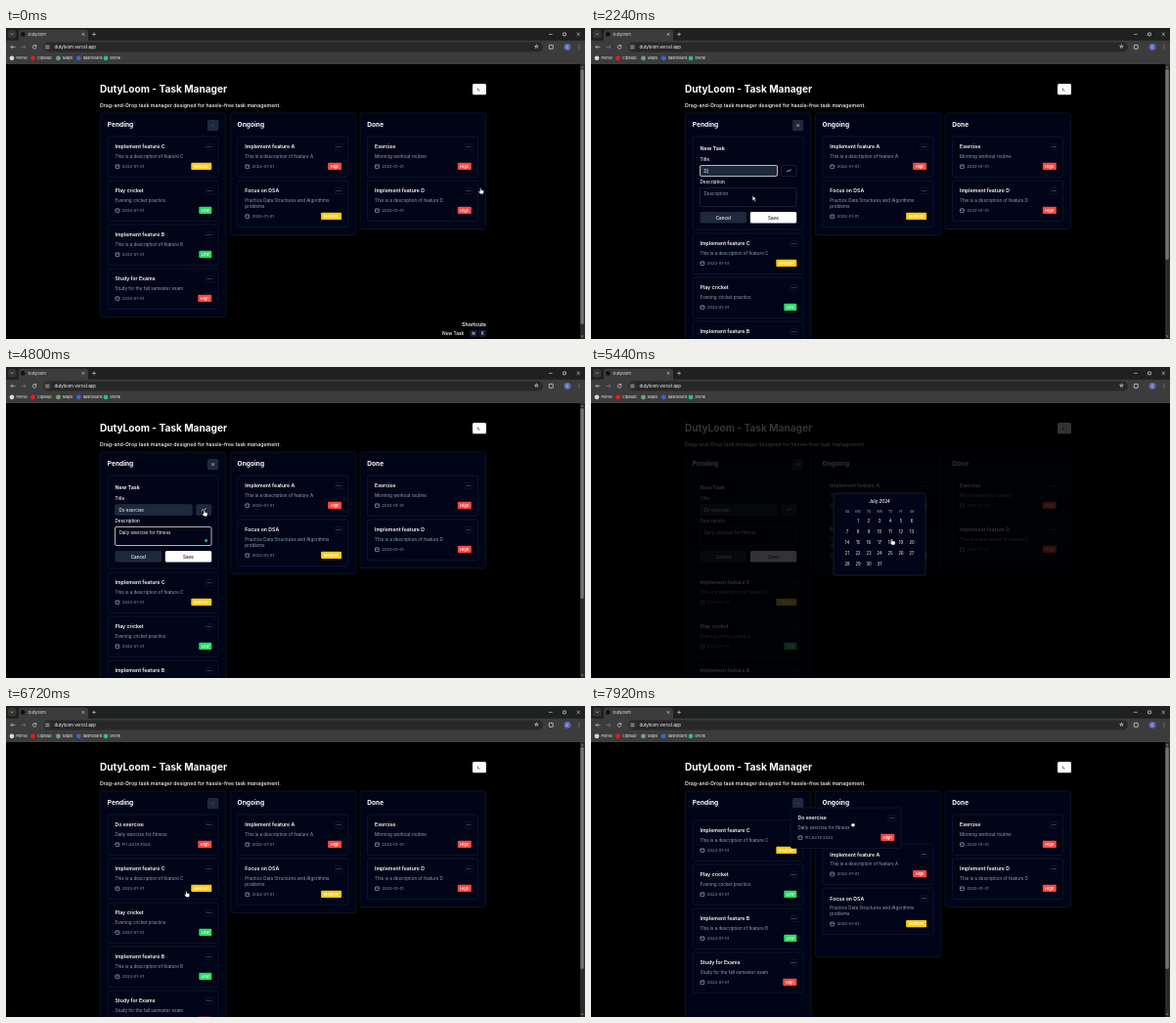
An HTML page for the animation above (8000 ms loop, 592 by 318 pixels).

```html
<!DOCTYPE html>
<html lang="en">
<head>
<meta charset="utf-8">
<title>Task board</title>
<style>
  html, body { margin: 0; width: 100%; height: 100%; overflow: hidden; background: #000; }
  svg { display: block; width: 100vw; height: 100vh; font-family: Inter, "Open Sans", sans-serif; }
  text { white-space: pre; }
</style>
</head>
<body>
<svg id="stage" viewBox="0 0 592 318"></svg>
<script>
const LOOP = 8000, STEP = 80;
const WHITE = '#fff', MUTED = '#94a3b8', LINE = '#101a30', SLATE = '#1e293b', CARD = '#010517';
const PRIORITY = { Low: ['#2bdc66', 13], Medium: ['#facc15', 21], High: ['#fa4743', 14] };
const stage = document.getElementById('stage');

function el(parent, tag, attrs = {}) {
  const node = document.createElementNS('http://www.w3.org/2000/svg', tag);
  set(node, attrs);
  return parent.appendChild(node);
}
function set(node, attrs) {
  for (const key in attrs) node.setAttribute(key, attrs[key]);
}
const group = parent => el(parent, 'g');
const show = (node, on) => set(node, { visibility: on ? 'visible' : 'hidden' });
const move = (node, x, y) => set(node, { transform: `translate(${x} ${y})` });

// Text is placed by its vertical middle.
function label(parent, x, y, string, size, fill = WHITE, weight = 400, anchor = 'start') {
  const node = el(parent, 'text', {
    x, y: y + size * .35, fill, 'font-size': size, 'font-weight': weight, 'text-anchor': anchor
  });
  node.textContent = string;
  return node;
}
function box(parent, x, y, width, height, fill, rx = 1.5, stroke = 'none') {
  return el(parent, 'rect', { x, y, width, height, fill, rx, stroke, 'stroke-width': .7 });
}
function dot(parent, cx, cy, r, fill) {
  return el(parent, 'circle', { cx, cy, r, fill });
}
function line(parent, d, stroke = '#dfe1e4', width = .6) {
  return el(parent, 'path', { d, stroke, 'stroke-width': width, fill: 'none', 'stroke-linecap': 'round' });
}

function column(x, name, height) {
  const frame = box(page, x, 87, 128.5, height, '#000417', 2, LINE);
  label(page, x + 7.3, 98.7, name, 6.6, WHITE, 700);
  return frame;
}
function card(parent, x, y, title, lines, date, priority) {
  const g = group(parent), extra = (lines.length - 1) * 6, foot = y + 30.5 + extra;
  box(g, x, y, 113, 41.5 + extra, CARD, 2, LINE);
  label(g, x + 7.5, y + 10.5, title, 5.2, WHITE, 600);
  box(g, x + 99.7, y + 7.5, 7.6, 6.2, 'none', 1, LINE);
  for (const i of [-1, 0, 1]) dot(g, x + 103.5 + i * 1.7, y + 10.6, .45, '#e2e8f0');
  lines.forEach((text, i) => label(g, x + 7.5, y + 20 + i * 6, text, 4.55, MUTED));
  box(g, x + 8, foot - 1.7, 3.8, 3.8, 'none', .5, MUTED);
  line(g, `M${x + 8} ${foot - .4}h3.8`, MUTED, .5);
  label(g, x + 15, foot, date, 4.05, MUTED);
  const [color, width] = PRIORITY[priority];
  box(g, x + 106.3 - width, foot - 3.7, width, 7.3, color, 1);
  label(g, x + 106.3 - width / 2, foot, priority, 4, WHITE, 500, 'middle');
  return g;
}

const page = group(stage);
label(page, 96, 62.5, 'DutyLoom - Task Manager', 10.1, WHITE, 700);
label(page, 96, 79, 'Drag-and-Drop task manager designed for hassle-free task management.', 5.25, WHITE, 500);
box(page, 477, 57, 14, 11.2, '#fff', 1.5);
el(page, 'path', { d: 'M483.2 60.8a1.9 1.9 0 1 0 2.4 2.4a1.7 1.7 0 0 1-2.4-2.4', fill: '#64748b' });

const DATE = '2022-01-01';
const about = letter => [`This is a description of feature ${letter}`];
const pending = column(96.5, 'Pending', 208.5);
const ongoing = column(229.3, 'Ongoing', 124.5);
column(362, 'Done', 118.5);

box(page, 206, 94, 11.2, 11.2, SLATE, 1.5);
const plus = line(page, 'M210 99.6h3.2M211.6 98v3.2', '#334155');
const cross = line(page, 'M210.5 98.5l2.2 2.2m0-2.2l-2.2 2.2', '#e2e8f0');

const ongoingCards = group(page);
card(ongoingCards, 236.8, 111, 'Implement feature A', about('A'), DATE, 'High');
card(ongoingCards, 236.8, 156, 'Focus on DSA', ['Practice Data Structures and Algorithms', 'problems'], DATE, 'Medium');
card(page, 369.5, 111, 'Exercise', ['Morning workout routine'], DATE, 'High');
card(page, 369.5, 156, 'Implement feature D', about('D'), DATE, 'High');

const pendingCards = group(page);
[
  ['Implement feature C', about('C'), 'Medium'],
  ['Play cricket', ['Evening cricket practice'], 'Low'],
  ['Implement feature B', about('B'), 'Low'],
  ['Study for Exams', ['Study for the fall semester exam'], 'High']
].forEach(([title, lines, priority], i) => card(pendingCards, 104, 111 + i * 45, title, lines, DATE, priority));
const added = card(page, 104, 111, 'Do exercise', ['Daily exercise for fitness'], 'Fri Jul 19 2024', 'High');

const shortcuts = group(page);
label(shortcuts, 491, 302.7, 'Shortcuts', 5.3, WHITE, 600, 'end');
label(shortcuts, 468.3, 312.3, 'New Task', 4.8, WHITE, 500, 'end');
for (const [x, key] of [[478, '⌘'], [487.3, 'K']]) {
  box(shortcuts, x - 4, 308.7, 8, 7.4, '#0f172a', 1);
  label(shortcuts, x, 312.4, key, 4.6, '#cbd5e1', 500, 'middle');
}

const form = group(page);
box(form, 104, 111, 113, 95, CARD, 2, LINE);
label(form, 111.5, 123, 'New Task', 5.4, WHITE, 600);
label(form, 111.5, 134.2, 'Title', 4.6, WHITE, 500);
label(form, 111.5, 157.5, 'Description', 4.6, WHITE, 500);
const titleBox = box(form, 111.5, 140.5, 79, 11, CARD);
const titleText = label(form, 115.5, 146, '', 4.6);
const dateButton = box(form, 194.5, 140.5, 15.5, 11, CARD, 1.5, SLATE);
line(form, 'M200.2 147l1.5-1.4 1 .8 1.5-1.6', '#e2e8f0', .8);
const notesBox = box(form, 111.5, 163.5, 98.5, 19, CARD);
const notesText = label(form, 115.5, 169.6, '', 4.55);
const checker = dot(form, 204.6, 177.4, 1.6, '#26a269');
box(form, 111.5, 188, 47.7, 11.5, SLATE);
label(form, 135.3, 194, 'Cancel', 4.6, WHITE, 500, 'middle');
box(form, 162.8, 188, 47.4, 11.5, '#fff');
label(form, 186.5, 194, 'Save', 4.6, '#0f172a', 500, 'middle');

const track = group(page);
box(track, 587, 37, 5, 281, '#2b2b2b', 0);
el(track, 'path', { d: 'M588 40.5l1.3-1.8 1.3 1.8zM588 314.5l1.3 1.8 1.3-1.8z', fill: '#8b8b8b' });
const thumb = box(track, 587.4, 42, 3.4, 261, '#737373', 1.7);

const modal = group(stage);
box(modal, 0, 37, 592, 281, 'rgba(0,0,0,.8)', 0);
box(modal, 248, 129, 94, 84, CARD, 2, SLATE);
label(modal, 295, 137, 'July 2024', 4.5, WHITE, 500, 'middle');
'Su Mo Tu We Th Fr Sa'.split(' ').forEach((day, i) =>
  label(modal, 262 + i * 11, 148, day, 3.8, MUTED, 400, 'middle'));
for (let day = 1; day <= 31; day++) {
  label(modal, 262 + day % 7 * 11, 158 + Math.floor(day / 7) * 11, day, 4.2, WHITE, 400, 'middle');
}

function browserBar() {
  const bar = group(stage), soft = '#e8eaed';
  box(bar, 0, 0, 592, 13, '#1f2020', 0);
  box(bar, 2, 2, 8.5, 8.5, '#343535', 2.5);
  line(bar, 'M5.2 5.8l1.1 1.1 1.1-1.1');
  box(bar, 13, 1.8, 71, 14, '#3c3c3c', 3);
  dot(bar, 17.3, 6.4, 2.3, '#111');
  label(bar, 22.5, 6.5, 'Dutyloom', 4, soft);
  line(bar, 'M78 5.4l2 2m0-2l-2 2M88.5 6.4h3M90 4.9v3M555.3 6.4h3M583.8 5l2.8 2.8m0-2.8l-2.8 2.8');
  box(bar, 569.6, 5, 2.8, 2.8, 'none', .3, soft);
  box(bar, 0, 12.8, 592, 24.2, '#3c3c3c', 0);
  line(bar, 'M9 19.4h-4m1.6-1.6l-1.6 1.6 1.6 1.6');
  line(bar, 'M16 19.4h4m-1.6-1.6l1.6 1.6-1.6 1.6', '#858585');
  line(bar, 'M30.6 18.2a1.9 1.9 0 1 0 .4 1.6m-.3-2.4v1.2h-1.2');
  box(bar, 38, 14.4, 511, 10.2, '#282828', 5.1);
  dot(bar, 42.3, 19.5, 3.5, '#3c3c3c');
  line(bar, 'M40.8 18.6h3M40.8 20.4h3');
  label(bar, 49.5, 19.6, 'dutyloom.vercel.app', 4.4, WHITE);
  label(bar, 542.3, 19.4, '☆', 5.5, soft, 400, 'middle');
  box(bar, 555.3, 17.4, 4, 4, 'none', .6, soft);
  dot(bar, 574, 19.4, 3.4, '#5c6bc0');
  label(bar, 574, 19.5, 'C', 3.8, WHITE, 400, 'middle');
  for (const i of [-1, 0, 1]) dot(bar, 586, 19.4 + i * 1.6, .45, soft);
  const bookmarks = [
    [6, '#d9d9d9', 'Pomel'], [27.5, '#f01818', 'ClipNub'], [53.5, '#6aa879', 'Maps'],
    [74.3, '#3767d6', 'dashboard'], [102, '#25c47b', 'brenk']
  ];
  for (const [x, color, name] of bookmarks) {
    dot(bar, x, 30.8, 2.4, color);
    label(bar, x + 4.4, 30.9, name, 3.9, soft);
  }
}
browserBar();

const cursor = group(stage);
const pointer = (d, fill = '#fff') =>
  el(cursor, 'path', { d, fill, stroke: '#111', 'stroke-width': .5, 'stroke-linejoin': 'round' });
const hand = pointer('M-1.5-3.1q.7-.7 1.3 0v1.7l2.2.5q.7.2.6 1l-.5 2.7h-3.2l-1.9-2.6q.2-.8 1.5 0z');
const arrow = pointer('M-1.4-3v5.3l1.3-1.2 1 2 1-.5-1-1.9h1.7z');
const fist = pointer('M-1.8-1q.9-1 1.8-.3q1-.6 1.9.4v1.6q-.4 1.2-1.6 1.2h-1q-1.4-.4-1.5-1.6z');

const PATH = [
  [0, 486, 167], [80, 484, 165], [880, 216.5, 105.5], [1200, 216.5, 105.5], [1920, 166.5, 174.5],
  [3760, 166.5, 174.5], [4400, 180, 160], [4640, 203.5, 150], [5040, 203.5, 150], [5520, 317, 181.5],
  [5680, 317, 181.5], [5920, 184.3, 160], [6400, 186, 194.5], [6640, 186, 194.5],
  [7440, 158, 128], [7600, 158, 128], [7920, 268, 121.5]
];
const clamp = p => Math.max(0, Math.min(1, p));
const progress = (t, start, length) => clamp((t - start) / length);
const easeOut = p => 1 - (1 - p) ** 3;
const smooth = p => p * p * (3 - 2 * p);

function cursorAt(t) {
  const i = PATH.findIndex(stop => stop[0] > t);
  if (i < 0) return PATH[PATH.length - 1].slice(1);
  const [t0, x0, y0] = PATH[i - 1], [t1, x1, y1] = PATH[i];
  const p = smooth((t - t0) / (t1 - t0));
  return [x0 + (x1 - x0) * p, y0 + (y1 - y0) * p];
}

function field(text, value, placeholder, focused) {
  text.textContent = value ? value + (focused ? '|' : '') : placeholder;
  set(text, { fill: value ? WHITE : MUTED });
}

function render(t) {
  const open = t >= 1200 && t < 6640, saved = t >= 6640, dragging = t >= 7680;
  const [x, y] = cursorAt(t);
  const shift = open ? 99 : saved ? 45 : 0;

  show(form, open);
  show(plus, !open);
  show(cross, open);
  show(added, saved);
  move(pendingCards, 0, shift - 45 * easeOut(progress(t, 7822, 200)));
  move(shortcuts, 0, shift);
  set(pending, { height: 208.5 + shift });
  set(thumb, { height: open ? 195 : saved ? 227 : 261 });
  move(added, dragging ? x - 168 : 0, dragging ? y - 128.5 : 0);
  move(ongoingCards, 0, 45 * easeOut(progress(t, 7858, 200)));
  set(ongoing, { height: t >= 7840 ? 169.5 : 124.5 });

  const title = 'Do exercise'.slice(0, Math.max(0, Math.round((t - 2160) / STEP)));
  const typed = t < 4160 ? 19 * progress(t, 3760, 320) : 19 + 7 * progress(t, 4160, 400);
  const notes = 'Daily exercise for fitness'.slice(0, Math.round(typed));
  const onTitle = t < 3280, onNotes = !onTitle && t < 4880;
  field(titleText, title, 'Visit codewithlumo.dev', onTitle);
  field(notesText, notes, 'Description', onNotes && t < 4640);
  set(titleBox, { fill: title ? SLATE : CARD, stroke: onTitle ? WHITE : SLATE });
  set(notesBox, { stroke: onNotes ? WHITE : SLATE });
  set(dateButton, { fill: t >= 4640 && t < 5840 ? SLATE : CARD });
  show(checker, open && notes && t < 4880);

  const fade = progress(t, 4800, 200) - progress(t, 5680, 200);
  set(modal, { opacity: fade });
  show(track, fade === 0);

  const pointing = t < 80 || (t >= 880 && t < 1360) || t >= 4400;
  const visible = t < 3840 || t >= 4480;
  move(cursor, x, y);
  show(hand, visible && pointing && !dragging);
  show(arrow, visible && !pointing);
  show(fist, dragging);
}

function tick() {
  render(Math.floor(performance.now() % LOOP / STEP) * STEP);
  requestAnimationFrame(tick);
}
tick();
</script>
</body>
</html>
```
